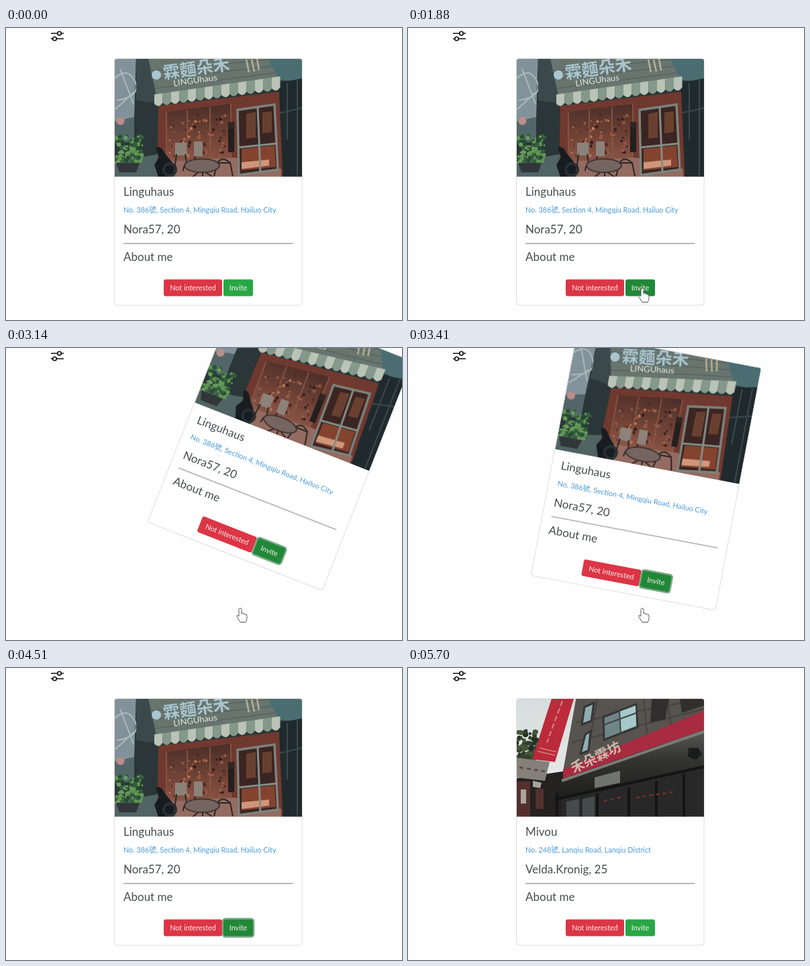
An HTML page that plays this animation: 590x435 px, repeating every 7020 ms.

```html
<!DOCTYPE html>
<html lang="en">
<head>
<meta charset="utf-8">
<title>Invite cards</title>
<style>
  html, body { margin: 0; height: 100%; overflow: hidden; background: #fefefe; }
  svg { display: block; width: 590px; height: 435px; }
  text { font-family: Lato, "Noto Sans CJK TC", "Noto Sans CJK", sans-serif; }
  .head { font-size: 17px; fill: #484c50; }
  .link { font-size: 10.8px; fill: #4a9bd6; }
  .label { font-size: 10.8px; fill: #fbeef0; text-anchor: middle; }
  .sign { font-weight: 700; fill: #a9c6d0; }
</style>
</head>
<body>
<svg viewBox="0 0 590 435">
  <defs>
    <clipPath id="photo"><path d="M162 221.500V49q0-3 3-3H438q3 0 3 3V221.500Z"/></clipPath>
    <filter id="soft" filterUnits="userSpaceOnUse" x="150" y="36" width="302" height="198"><feGaussianBlur stdDeviation=".7"/></filter>
    <linearGradient id="glow" x2="0" y2="1">
      <stop stop-color="#4a2e29"/><stop offset=".5" stop-color="#6d4034"/><stop offset="1" stop-color="#8a5546"/>
    </linearGradient>
    <linearGradient id="sky" x2="0" y2="1">
      <stop stop-color="#d5dcdd"/><stop offset="1" stop-color="#eeeeea"/>
    </linearGradient>
    <linearGradient id="shade" x2="0" y2="1">
      <stop stop-color="#5b5b56"/><stop offset=".45" stop-color="#333432"/><stop offset="1" stop-color="#1d1c1c"/>
    </linearGradient>
  </defs>

  <g fill="#fff" stroke="#111" stroke-width="1.6" stroke-linecap="round">
    <path d="M67.500 8H85.500M67.500 16H85.500"/>
    <circle cx="79.500" cy="8" r="2.800"/><circle cx="72.500" cy="16" r="2.800"/>
  </g>

  <g id="card">
    <rect x="161.500" y="45.500" width="279.500" height="367.500" rx="3.500" fill="#fff" stroke="#dedede"/>

    <g id="pasta" clip-path="url(#photo)"><g filter="url(#soft)">
      <path fill="#2b3638" d="M150 36H452V234H150Z"/>
      <path fill="#82929a" d="M150 36H194L191 133 150 142Z"/>
      <path fill="none" stroke="#acb9bc" stroke-width="2" d="M162 75Q181 57 192 79T165 108M170 61L190 113M163 121L190 96"/>
      <path fill="#52666a" d="M150 142L191 133V170H150Z"/>
      <path fill="#3b494c" d="M194 36H233L224 112 194 108Z"/>
      <path fill="#68756f" d="M210 36H408L405 74 224 101Z"/>
      <path stroke="#4d5a57" d="M212 64L404 46M216 77L406 56M222 90L407 66"/>
      <path stroke="#b8b096" stroke-width="2.500" d="M358 47L362 66M366 47L370 65M374 46L377 63"/>
      <path fill="#4a6d71" d="M385 36H452V80L407 78Z"/>
      <path fill="#202a2d" d="M405 82L452 73V234H412Z"/>
      <path stroke="#3a494c" stroke-width="2" d="M419 82V166M434 78V220M407 127L441 119"/>
      <path fill="#70392f" d="M227 116L407 95 413 234H225Z"/>
      <path fill="url(#glow)" d="M239 125L335 113V194L240 199Z"/>
      <g id="lamps"></g>
      <path fill="none" stroke="#8e5b48" stroke-width="1.500" d="M239 125V199M270 122V195M304 118V194M335 113V200"/>
      <path fill="#946b60" d="M237 199L340 193 410 210V234H237Z"/>
      <path fill="#3a2522" stroke="#7d827d" stroke-width="3.500" d="M345 122L400 114 405 211 347 219Z"/>
      <path fill="#84432f" d="M351 180L400 175 402 207 351 212Z"/>
      <path fill="#cf967a" d="M351 200L392 196V205L351 210Z"/>
      <path stroke="#858c86" stroke-width="3" d="M346 178L404 172M375 118L379 214"/>
      <path fill="#69402f" d="M358 128L372 125V163L358 165ZM382 126L396 124V155L382 157Z"/>
      <path fill="#241f20" d="M331 140h9v45h-9Z"/>
      <circle cx="335.500" cy="145" r="5" fill="#302625"/>
      <g id="awning"></g>
      <circle cx="224" cy="70" r="7" fill="#a9c6d0"/>
      <g transform="rotate(-8 250 87)">
        <text class="sign" x="237" y="74" font-size="25">霖麵朵禾</text>
        <text x="250" y="87" font-size="13" fill="#dfe5e3">LINGUhaus</text>
      </g>
      <circle cx="170.500" cy="138.500" r="6" fill="#b98d8a"/>
      <path fill="#4f6463" d="M150 201L226 188V234H150Z"/>
      <g id="plant"></g>
      <path fill="#313739" d="M164 201H199L194 215H169Z"/>
      <path fill="#161d20" d="M223 178q8-3 13 8l14 17v19h-23l-6-18 7-12Z"/>
      <circle cx="244" cy="211" r="9" fill="none" stroke="#283034" stroke-width="4"/>
      <path fill="#8c8279" d="M252 171h17v19h-17ZM280 169h13v22h-13Z"/>
      <path fill="none" stroke="#2a2625" stroke-width="2" d="M254 188l-3 24M267 188l3 20M282 191l-3 13M293 221V208M278 222l13-11 17 11M310 221l5-20h19l4 20M315 201q7-11 19 0M264 213q1-16 13-10"/>
      <ellipse cx="292" cy="205" rx="26" ry="10" fill="#766460" stroke="#3d3433" stroke-width="2"/>
    </g></g>

    <g id="corner" clip-path="url(#photo)"><g filter="url(#soft)">
      <path fill="url(#sky)" d="M150 36H452V234H150Z"/>
      <path fill="#57534f" d="M252 36H452V150L229 165Z"/>
      <path stroke="#45423f" stroke-width="2" d="M250 81L441 46M244 111L441 61M282 46L263 151M351 46L358 113M386 46L394 98"/>
      <path fill="#6f8588" stroke="#343635" stroke-width="3" d="M291 73L340 54 342 88 292 107Z"/>
      <path fill="#a6c9cb" d="M315 65L339 56 340 86 317 95Z"/>
      <path fill="#8fadb0" stroke="#343635" stroke-width="3" d="M263 58L277 52 273 79 259 84ZM264 99L272 94 269 123 257 128Z"/>
      <path stroke="#3e4645" stroke-width="2" d="M315 63L317 98M291 85L340 67"/>
      <path fill="#302f2e" d="M364 36h27l-8 41-22 4ZM404 36h48v16l-44 15Z"/>
      <g id="tree"></g>
      <path fill="#bb2b3a" d="M217 36H250L219 140 185 136Z"/>
      <path stroke="#d08e8f" stroke-width="2" stroke-dasharray="8 4" d="M230 49L207 111"/>
      <path stroke="#d9a5a1" stroke-width="1.200" d="M193 124L219 130M196 119L221 125"/>
      <path fill="#242121" d="M150 166L231 154 452 94V234H150Z"/>
      <path fill="#a92b40" d="M231 151L452 59V88L231 165Z"/>
      <path fill="url(#shade)" d="M231 165L452 88V150L217 196Z"/>
      <path stroke="#7c7c75" stroke-width="4" d="M229 168L452 91"/>
      <path fill="#6f756d" d="M278 163L316 153V171L278 179Z"/>
      <path fill="#85817a" d="M150 132L211 140 204 168 150 162Z"/>
      <path stroke="#54514d" stroke-width="3" stroke-dasharray="6 5" d="M166 148L204 154"/>
      <path fill="#53302e" d="M150 169h32v65h-32ZM190 180h12v30h-12Z"/>
      <path fill="#aaa59b" d="M168 181h8v21h-8ZM186 168l13 3-2 8-11-2Z"/>
      <path fill="#282828" d="M229 194L452 145V234H229Z"/>
      <path fill="#454b4a" d="M236 199L255 195V234H236ZM260 195L278 191V234H260Z"/>
      <path stroke="#131414" stroke-width="4" d="M222 186V222M282 187V222M329 178V222M370 168V222M411 157V222M223 195L441 147"/>
      <path stroke="#74322e" stroke-width="2.500" stroke-dasharray="5 5" d="M292 198L320 192M340 193L399 184"/>
      <text class="sign" transform="translate(247 157) rotate(-26)" font-size="20" style="fill:#cdbcae">禾朵霖坊</text>
      <path fill="#1a1b1b" d="M418 119h14l6 9-9 9-12-5Z"/>
    </g></g>

    <text class="head" id="place" x="175" y="249.500"></text>
    <text class="link" id="address" x="175" y="274.500"></text>
    <text class="head" id="person" x="175" y="305.500"></text>
    <path stroke="#b8b8b8" stroke-width="1.800" d="M175 321H427.500"/>
    <text class="head" x="175" y="347">About me</text>
    <rect x="235" y="374.500" width="87" height="25" rx="3" fill="#dc3545"/>
    <text class="label" x="278.500" y="390.700">Not interested</text>
    <rect id="ring" x="323" y="373.500" width="46" height="27" rx="4" fill="none" stroke="#7fa889" stroke-width="2.500"/>
    <rect id="invite" x="324" y="374.500" width="44" height="25" rx="3"/>
    <text class="label" x="346" y="390.700">Invite</text>
  </g>

  <path id="hand" fill="#fff" stroke="#555" stroke-linejoin="round"
    d="M-2 2Q0-2 2 2V8Q4 6 5 9Q7 7 8 10Q10 9 10 12V15Q10 18 8 21H0L-5 13Q-6 9-2 12Z"/>
</svg>
<script>
const LOOP = 7020, SWAP = 4700;
const $ = id => document.getElementById(id);

const profiles = [
  { place: "Linguhaus", address: "No. 386號, Section 4, Mingqiu Road, Hailuo City", person: "Nora57, 20" },
  { place: "Mivou", address: "No. 248號, Lanqiu Road, Lanqiu District", person: "Velda.Kronig, 25" }
];
// [time, x, y] of the pointer and [time, amount] of the swipe
const pointer = [[570, 334, 430], [680, 336, 420], [790, 339, 408], [890, 343, 400], [1000, 347, 393], [1110, 349, 387.5]];
const swipe = [[0, 0], [3000, .45], [3140, 2], [3230, 3.6], [3320, 2.8], [3410, 1], [3490, .3], [3610, 0]];

let seed = 7;
const random = () => (seed = seed * 16807 % 2147483647) / 2147483647;
const at = (steps, t) => steps.filter(step => step[0] <= t).pop();
const show = (id, on) => $(id).setAttribute("visibility", on ? "visible" : "hidden");

function scatter(id, count, x, y, w, h, size, colors) {
  let dots = "";
  for (let i = 0; i < count; i++) {
    const fill = colors[i % colors.length];
    dots += `<circle cx="${x + random() * w}" cy="${y + random() * h}" r="${size * (.5 + random())}" fill="${fill}"/>`;
  }
  $(id).innerHTML = dots;
}

function drawAwning() {
  const count = 15, x = i => 221 + i * 12.5;
  let stripes = "";
  for (let i = 0; i < count; i++) {
    const top = 99 - i * 1.8, low = 113 - i * 1.65;
    stripes += `<path fill="${i % 2 ? "#84998a" : "#b9c3b6"}" d="M${x(i)} ${top}L${x(i + 1)} ${top - 1.8}V${low - 1.65}q-6 9-12.500 1.650Z"/>`;
  }
  $("awning").innerHTML = stripes;
}

scatter("lamps", 70, 244, 129, 86, 62, 1.8, ["#b97a5a", "#8f5542", "#38201f", "#9a5a45", "#4d2c27"]);
scatter("plant", 110, 163, 160, 41, 41, 2.6, ["#345f3c", "#5f9652", "#274b34", "#6c9a60"]);
scatter("tree", 80, 162, 93, 30, 47, 3.2, ["#30402d", "#465639", "#202f24"]);
drawAwning();

function render(t) {
  const next = t >= SWAP;
  const profile = profiles[+next];
  for (const id in profile) if ($(id).textContent !== profile[id]) $(id).textContent = profile[id];
  show("pasta", !next);
  show("corner", next);

  const [, amount] = at(swipe, t);
  $("card").setAttribute("transform", `translate(${53.3 * amount} ${-45 * amount}) rotate(${10.7 * amount} 301.5 230)`);

  $("invite").setAttribute("fill", t >= 1000 && !next ? "#218838" : "#28a745");
  $("ring").setAttribute("opacity", next ? 0 : Math.min(1, Math.max(0, (t - 2400) / 150)));

  const tip = at(pointer, t);
  show("hand", tip && t < 4510);
  if (tip) $("hand").setAttribute("transform", `translate(${tip[1]} ${tip[2]})`);
}

const start = performance.now();
function tick() {
  render((performance.now() - start) % LOOP);
  requestAnimationFrame(tick);
}
tick();
</script>
</body>
</html>
```
